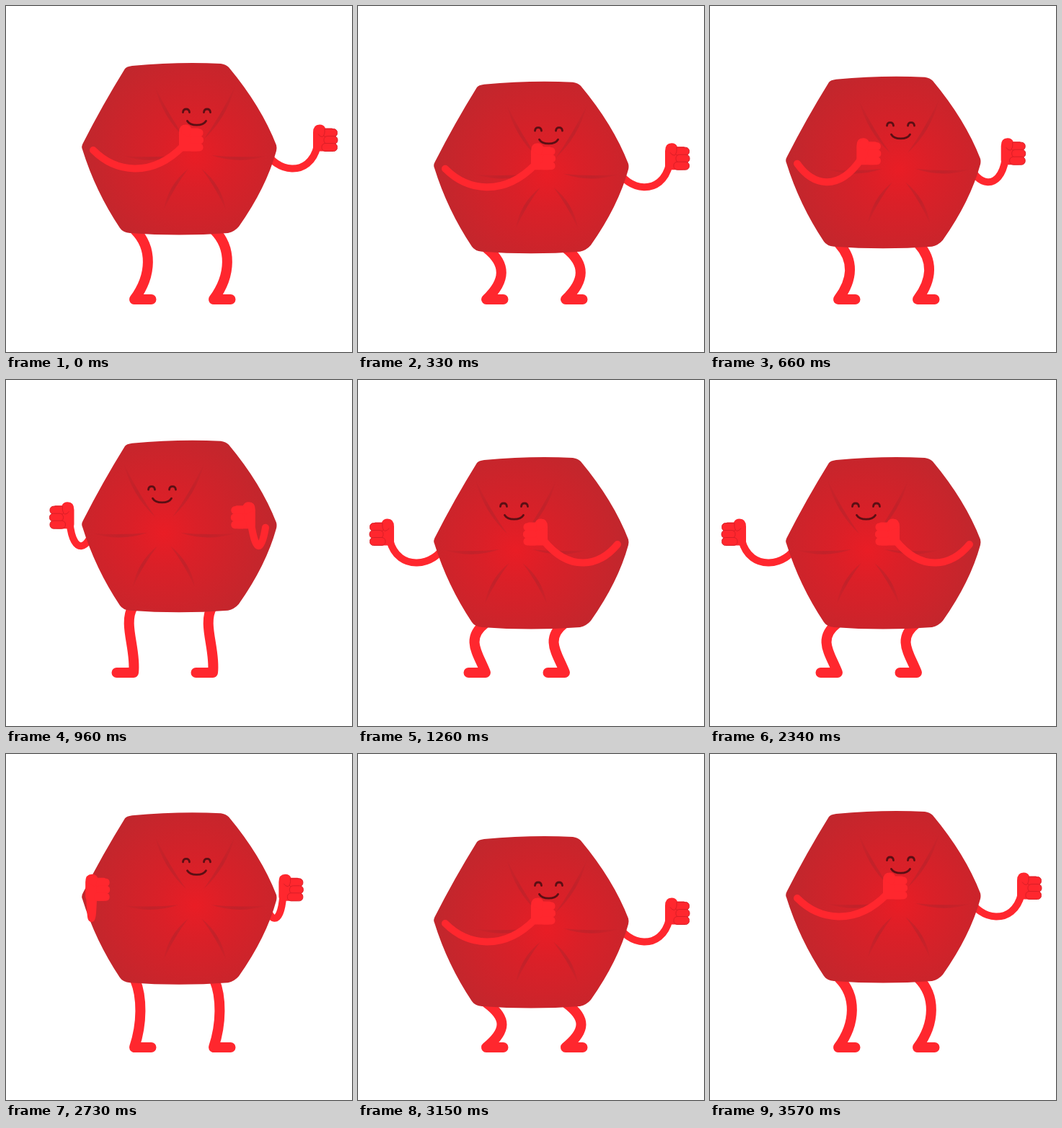
An HTML page that plays this animation: 480x480 px, repeating every 3.6 s.

```html
<!DOCTYPE html>
<html lang="en">
<head>
<meta charset="utf-8">
<title>Dancing hexagon</title>
<style>
  html, body { margin: 0; width: 100%; height: 100%; overflow: hidden; background: #fff; }
  svg { display: block; width: 100vw; height: 100vh; }
  .limb { fill: none; stroke: #ff272e; stroke-linecap: round; stroke-linejoin: round; }
  .leg { stroke-width: 14; }
  .arm { stroke-width: 10; }
  .fist { fill: #ff272e; }
  .lined { stroke: #d91f27; stroke-width: 1; }
  .face { fill: none; stroke: #5a0f14; stroke-width: 2.8; stroke-linecap: round; }
</style>
</head>
<body>
<svg viewBox="0 0 480 480">
  <defs>
    <radialGradient id="skin" gradientUnits="userSpaceOnUse" cx="262" cy="208" r="158">
      <stop offset="0" stop-color="#e91d25"/>
      <stop offset=".3" stop-color="#da2028"/>
      <stop offset="1" stop-color="#c0272d"/>
    </radialGradient>
    <linearGradient id="shade" gradientUnits="userSpaceOnUse" x1="22" y1="0" x2="96" y2="0">
      <stop offset="0" stop-color="#bd222a" stop-opacity=".5"/>
      <stop offset=".5" stop-color="#bd222a" stop-opacity=".8"/>
      <stop offset="1" stop-color="#bd222a" stop-opacity=".2"/>
    </linearGradient>
    <g id="fist" class="fist">
      <path stroke="none" d="M-17 12V-8Q-17 -19 -8 -19Q-2 -19 0 -14H9Q13 -13 13 -8V13Q12 18 6 18H-10Q-17 18 -17 12Z"/>
      <rect x="-4" y="-13" width="20.5" height="11" rx="5"/>
      <rect x="-2" y="-3" width="19" height="11" rx="5"/>
      <rect x="-5" y="7" width="21.5" height="11" rx="5"/>
      <path stroke="none" d="M-14 -7Q-13 -18 -8 -18Q-2 -18 -1 -12Q-1 -5 -4 -2Z"/>
      <path fill="none" d="M-1 -13Q0 -5 -4 -2Q-8 -2 -10 -6"/>
    </g>
  </defs>
  <g id="legs">
    <path class="limb leg"/>
    <path class="limb leg" transform="translate(110 0)"/>
  </g>
  <g id="bob">
    <g class="turn">
      <path id="backArm" class="limb arm"/>
      <use id="backFist" href="#fist" class="lined"/>
    </g>
    <path fill="url(#skin)" d="M165 87Q167 84 175 83Q240 77 298 80Q305 81 309 85Q354 139 375 193Q376 197 375 201Q361 252 323 306Q317 313 308 315Q240 320 172 315Q162 314 158 308Q124 257 106 199Q104 195 107 190Q134 137 165 87Z"/>
    <g class="turn">
      <g id="creases" transform="translate(262 208)"></g>
      <g class="face">
        <path d="M245.500 147.500C246 141.500 254 141.500 254.500 147.500"/>
        <path d="M274.500 147.500C275 141.500 283 141.500 283.500 147.500"/>
        <path d="M251.500 159.500C256 167 273 167 277.500 159.500"/>
      </g>
      <path id="frontArm" class="limb arm"/>
      <use id="frontFist" href="#fist"/>
    </g>
  </g>
</svg>
<script>
const LOOP = 3600;
// start, turning point and end of each turn, with the side faced before it
const TURNS = [
  { from: 540, mid: 900, to: 1080, side: 1 },
  { from: 2340, mid: 2700, to: 2880, side: -1 }
];
// resting hands and leg bend for each side, and the hands at the turning point
const REST = {
  '1': { front: 257, back: 443, knee: 203, shin: 203 },
  '-1': { front: 235, back: 448, knee: 204, shin: 185 }
};
const OPEN = { front: 90, back: 391 };

const $ = id => document.getElementById(id);
const mix = (a, b, k) => a + (b - a) * k;
const turners = document.querySelectorAll('.turn');
const legs = $('legs').children;
const skin = $('skin');

function addCrease(angle, mirror) {
  const crease = document.createElementNS('http://www.w3.org/2000/svg', 'path');
  const length = 1.04 - .15 * Math.sin(angle * Math.PI / 180);
  const bow = angle > 0 ? -1 : 1;
  crease.setAttribute('d', 'M22 -1Q55 3 95 0Q58 12 22 -1Z');
  crease.setAttribute('fill', 'url(#shade)');
  crease.setAttribute('transform', `scale(${mirror} 1) rotate(${angle}) scale(${length} ${bow})`);
  $('creases').append(crease);
}
for (const angle of [-60, 0, 60]) {
  addCrease(angle, 1);
  addCrease(angle, -1);
}

function bounce(t) {
  if (t > 3150) return 35 * Math.max(0, 1 - (t - 3150) / 420);
  const p = t % 900 / 450;
  return 35 * (p < 1 ? p : 2 - p);
}

function pose(t) {
  let side = 1, open = 0;
  for (const k of TURNS) {
    if (t >= k.mid) side = -k.side;
    if (t > k.from && t < k.to) {
      open = t < k.mid ? (t - k.from) / (k.mid - k.from) : (k.to - t) / (k.to - k.mid);
    }
  }
  return { side, open };
}

function setArm(name, shoulder, hand, bendA, bendB) {
  const wrist = hand - 11;
  const a = mix(shoulder, wrist, bendA), b = mix(shoulder, wrist, bendB);
  $(name + 'Arm').setAttribute('d', `M${shoulder} 200C${a} 230 ${b} 240 ${wrist} 194`);
  $(name + 'Fist').setAttribute('transform', `translate(${hand} 183.500)`);
}

function setLegs(y, open, rest) {
  const bend = y * .1 - open * 17;
  const top = `${rest.knee + bend} ${335 + y * .9}`;
  const low = `${rest.shin + bend} ${373 + y * .3}`;
  const d = `M179 ${311 + y}C${top} ${low} 178 407H201.500`;
  for (const leg of legs) leg.setAttribute('d', d);
}

function draw(t) {
  const y = bounce(t);
  const { side, open } = pose(t);
  const flip = side > 0 ? '' : 'translate(481 0) scale(-1 1)';
  const rest = REST[side];

  $('bob').setAttribute('transform', `translate(0 ${y})`);
  turners.forEach(g => g.setAttribute('transform', flip));
  skin.setAttribute('cx', side > 0 ? 262 : 219);
  setArm('front', 121, mix(rest.front, OPEN.front, open ** 1.38), .24, .64);
  setArm('back', 360, mix(rest.back, OPEN.back, 1 - (1 - open) ** 1.38), .17, .85);
  setLegs(y, open, rest);
  $('legs').setAttribute('transform', side > 0 ? '' : 'translate(465 -1) scale(-1 1)');
}

let start;
function tick(now) {
  start ??= now;
  draw((now - start) % LOOP);
  requestAnimationFrame(tick);
}
draw(0);
requestAnimationFrame(tick);
</script>
</body>
</html>
```
